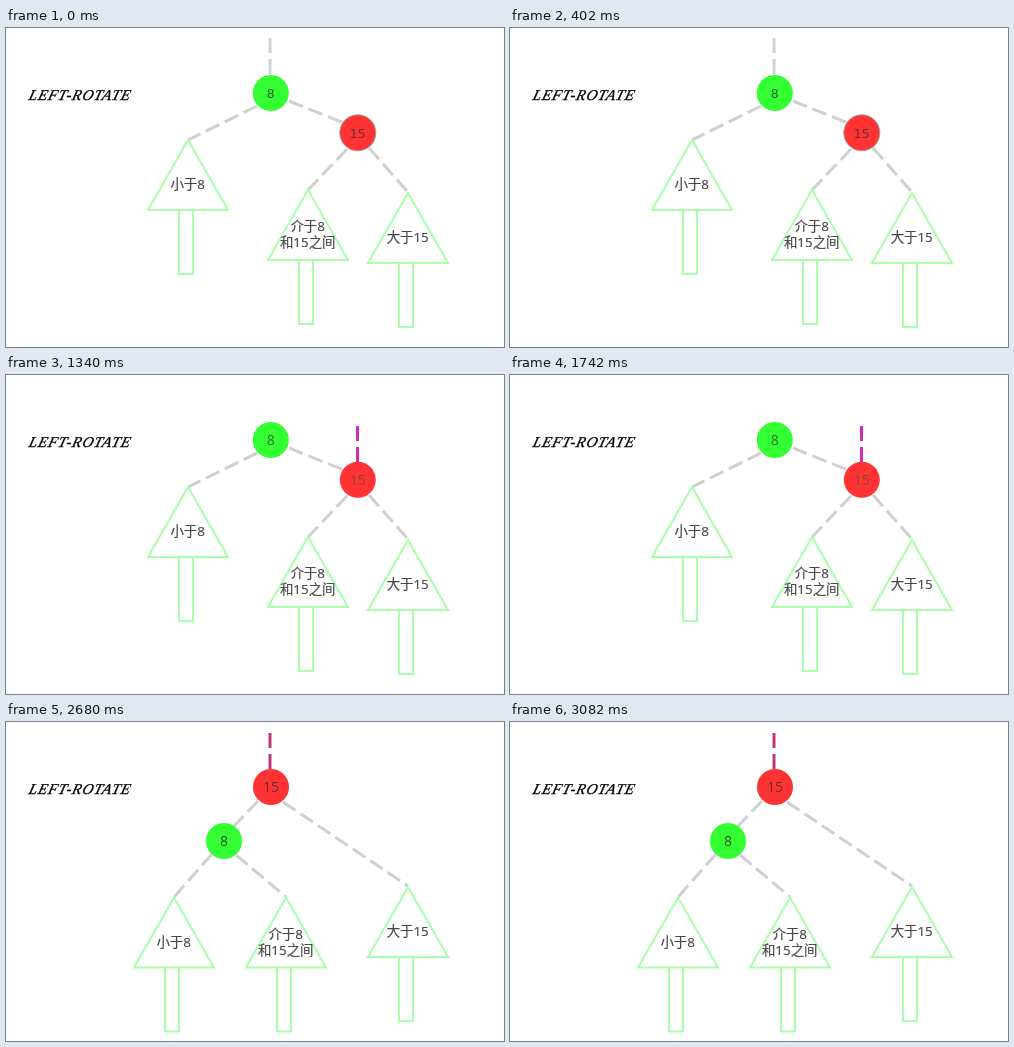
These frames come from a looping animation (498x319 px, 3350 ms). An HTML page:

```html
<!DOCTYPE html>
<html lang="zh">
<head>
<meta charset="utf-8">
<title>Left rotation</title>
<style>
html, body { margin: 0; width: 100%; height: 100%; overflow: hidden; background: #fff; }
svg { display: block; width: 100%; height: 100%; }
text { font: 13.4px "Open Sans", "Noto Sans CJK SC", "Noto Sans CJK", sans-serif; fill: #484848; stroke: #484848; stroke-width: .2; text-anchor: middle; }
.title { font: italic 15px "Liberation Serif", serif; letter-spacing: .9px; fill: #000; stroke: #000; stroke-width: .3; text-anchor: start; }
.value { font-size: 14.2px; stroke: none; }
.mono { font: 13px "DejaVu Sans Mono", monospace; letter-spacing: .4px; }
.edge { stroke: #d0d0d0; stroke-width: 3; stroke-dasharray: 15 6; }
.tree { fill: #fff; stroke: #aaffaa; stroke-width: 2; }
</style>
</head>
<body>
<svg viewBox="0 0 498 319">
  <g id="scene"></g>
  <text class="title" transform="translate(22 72) skewX(-15)">LEFT-ROTATE</text>
</svg>
<script>
const STEP = 670;
const scene = document.getElementById('scene');

const label = (x, y, text, attrs = '') => `<text x="${x}" y="${y}" ${attrs}>${text}</text>`;
const edge = (x1, y1, x2, y2) => `<path class="edge" d="M${x1} ${y1}L${x2} ${y2}"/>`;
const stem = (x, y, color) =>
  `<path d="M${x} ${y}v15m0 6v15" stroke="${color}" stroke-width="3"/>`;
const tree = (x, y, ...lines) =>
  `<path class="tree" d="M${x} ${y}l40 70h-80zM${x - 9} ${y + 70}h14v64h-14z"/>` +
  lines.map((line, i) => label(x - 0.3, y + 49 + 16 * i - 8 * (lines.length - 1), line)).join('');
const node = (x, y, fill, value, ink, mono) =>
  `<circle cx="${x}" cy="${y}" r="18" fill="${fill}"${mono && value > 8 ? ' stroke="#a09a9a"' : ''}/>` +
  label(x, y + 5, value, `style="fill:${ink}" class="value${mono ? ' mono' : ''}"`);

const small = (x, y) => tree(x, y, '小于8');
const middle = (x, y) => tree(x, y, '介于8', '和15之间');
const large = tree(402, 165, '大于15');
const green = (x, y, ink, mono) => node(x, y, '#33ff33', 8, ink, mono);
const red = (x, y, ink, mono) => node(x, y, '#ff3333', 15, ink, mono);

// The tree while 8 is still above 15; the middle subtree may hang from either.
function before(stemMark, middleEdge, ink8, ink15, mono) {
  return stemMark + edge(251, 78, 182, 112) + edge(283, 73, 338, 95) + middleEdge +
    edge(363, 120, 402, 164) + small(182, 112) + middle(302, 162) + large +
    green(264.8, 65, ink8, mono) + red(351.8, 104.8, ink15, mono);
}

const under15 = edge(341, 121, 302, 162);
const under8 = edge(265, 83, 299, 164);
const after = stem(264, 11, '#c03878') +
  edge(252, 79, 228, 104) + edge(277, 80, 402, 164) +
  edge(206, 132, 168, 175) + edge(230, 133, 280, 175) +
  small(168, 175.5) + middle(280, 175.5) + large +
  red(265, 65, '#603030') + green(218, 119, '#305030');

const steps = [
  before(stem(264, 10, '#d0d6d6'), under15, '#286028', '#703030', true),
  before(stem(263, 10, '#d41cd4'), under15, '#286028', '#703030', true),
  before(stem(351.5, 51, '#d42cb8'), under15, '#367036', '#8a4630'),
  before(stem(351.5, 51, '#c63cb8'), under8, '#305030', '#603030'),
  after
];

let current = -1;
function draw() {
  const index = Math.floor(performance.now() / STEP) % steps.length;
  if (index !== current) scene.innerHTML = steps[current = index];
  requestAnimationFrame(draw);
}
draw();
</script>
</body>
</html>
```
